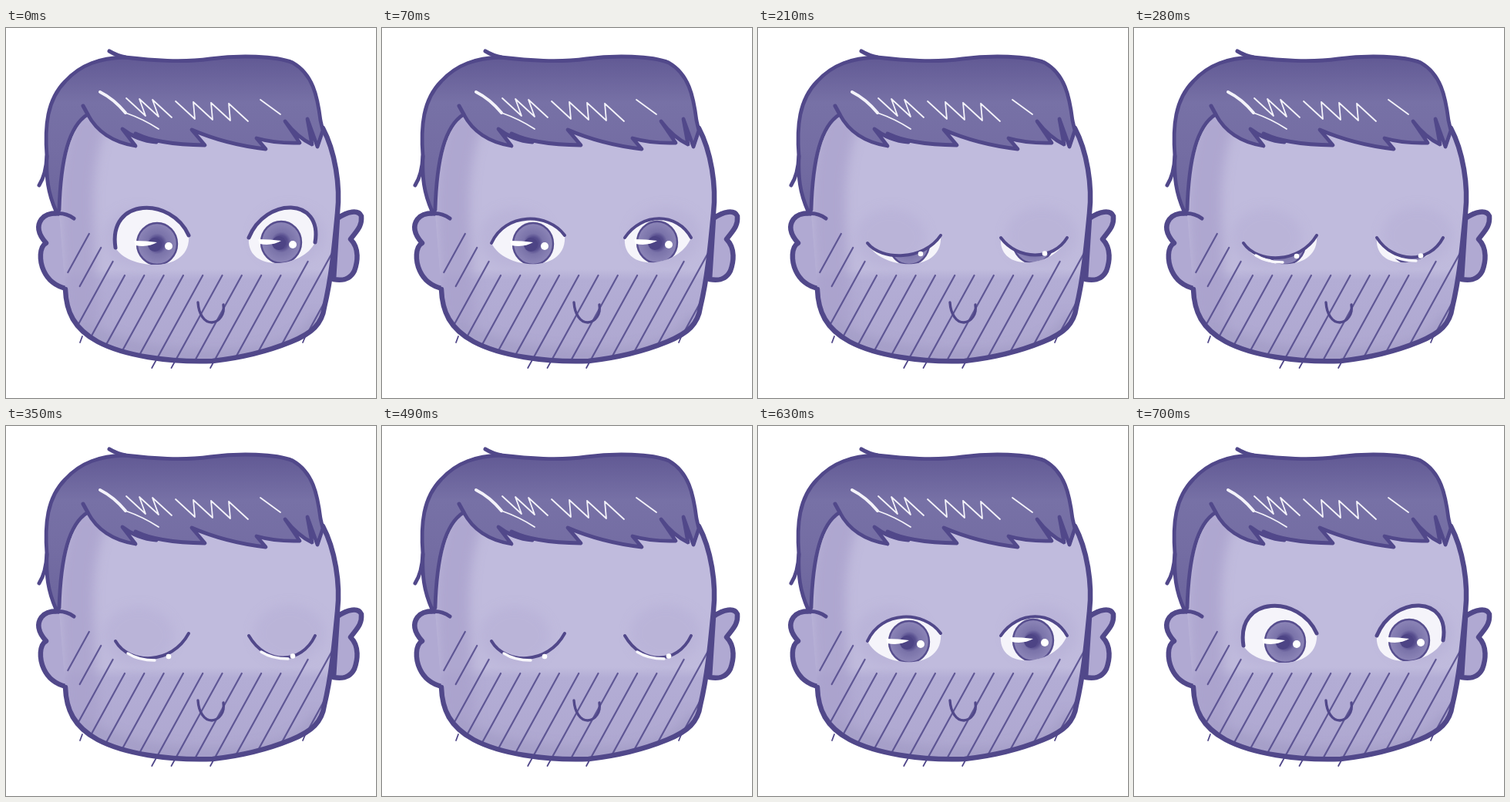
Write an HTML page that moves like this. It is 480 px wide and 480 px high and loops after 1540 ms.

```html
<!DOCTYPE html>
<html lang="en">
<head>
<meta charset="utf-8">
<title>Blink</title>
<style>
html, body { margin: 0; width: 100%; height: 100%; overflow: hidden; background: #fff; }
svg { display: block; width: 100vw; height: 100vh; }
.line { fill: none; stroke: #51488a; stroke-linecap: round; stroke-linejoin: round; }
</style>
</head>
<body>
<svg viewBox="0 0 480 480">
  <defs>
    <linearGradient id="hair" x2="0" y2="1">
      <stop offset="0" stop-color="#615994"/>
      <stop offset=".3" stop-color="#7771a6"/>
      <stop offset=".6" stop-color="#746da3"/>
      <stop offset="1" stop-color="#6c659d"/>
    </linearGradient>
    <linearGradient id="skin" gradientUnits="userSpaceOnUse" x1="0" y1="90" x2="0" y2="433">
      <stop offset=".65" stop-color="#c0bbdd"/>
      <stop offset=".69" stop-color="#b3add5"/>
      <stop offset="1" stop-color="#aea7d0"/>
    </linearGradient>
    <radialGradient id="iris">
      <stop offset="0" stop-color="#483f80"/>
      <stop offset=".32" stop-color="#574e8e"/>
      <stop offset=".5" stop-color="#7a73a9"/>
      <stop offset="1" stop-color="#8d86b8"/>
    </radialGradient>
    <filter id="soft" x="-50%" y="-50%" width="200%" height="200%"><feGaussianBlur stdDeviation="7"/></filter>
    <path id="face" d="M110 111C84 128 73 170 69 240L77 338C78 368 88 390 119 407C153 425 210 434 268 432C304 428 338 420 370 407C397 396 410 384 413 362C422 325 426 282 430 240C434 205 427 160 410 130L390 105L250 90Z"/>
    <path id="mane" d="M65 238C54 213 52 194 53 166C50 128 53 93 77 69C97 47 122 39 154 38C190 42 228 45 265 40C302 35 350 36 372 45C398 60 404 88 408 120L411 133L404 154L391 118L397 151Q378 142 362 121L381 149Q350 150 325 143L337 157Q285 151 241 132L258 152Q196 151 168 137L195 148Q170 146 151 131L168 153Q124 146 106 112C82 127 71 168 69 236Z"/>
    <clipPath id="inFace"><use href="#face"/></clipPath>
  </defs>

  <g class="line" stroke-width="6.5">
    <path fill="#b0a9d2" d="M88 247C77 239 55 237 46 248C38 259 44 270 52 279C43 284 43 302 49 315C55 328 65 335 78 338"/>
    <path fill="#b0a9d2" d="M430 247C443 238 457 235 461 244C462 258 455 263 447 274C459 286 456 304 452 315C446 327 436 328 425 326Z"/>
  </g>
  <use href="#face" fill="url(#skin)"/>
  <g clip-path="url(#inFace)">
    <g filter="url(#soft)" fill="none">
      <path d="M112 115Q88 170 92 250T100 385" stroke="#a8a1cb" stroke-width="44" opacity=".75"/>
      <path d="M95 385Q150 425 265 427T407 375" stroke="#9c95c0" stroke-width="18" opacity=".55"/>
      <ellipse cx="172" cy="272" rx="46" ry="38" fill="#b1aad2" opacity=".4"/>
      <ellipse cx="368" cy="269" rx="46" ry="37" fill="#b1aad2" opacity=".4"/>
    </g>
    <path id="hatch" class="line" stroke-width="2.2" opacity=".85"/>
  </g>
  <path id="ends" class="line" stroke-width="1.8"/>
  <path class="line" stroke-width="6.5" d="M411 130C427 160 434 205 430 240C426 282 422 325 413 362C410 384 397 396 370 407C338 420 304 428 268 432C210 434 153 425 119 407C88 390 78 368 77 339"/>
  <path class="line" stroke-width="5" d="M88 247Q76 239 64 241"/>

  <use href="#mane" fill="url(#hair)"/>
  <use href="#mane" class="line" stroke-width="4.8"/>
  <path class="line" stroke-width="5" d="M134 30Q144 36 155 38M53 166Q52 190 43 204M106 112L100 101"/>
  <g fill="none" stroke="#f4f3fa" stroke-linecap="round" stroke-linejoin="round">
    <path d="M122 83Q140 92 155 110" stroke-width="4"/>
    <path id="shine" stroke-width="1.8"/>
  </g>

  <path class="line" stroke-width="3.4" d="M249 356C250 371 257 382 267 382C277 381 284 371 282 359"/>
  <g id="eyes"></g>
</svg>
<script>
const $ = id => document.getElementById(id);
const set = (id, attrs) => Object.entries(attrs).forEach(([k, v]) => $(id).setAttribute(k, v));

// Parallel cheek strokes; their tops climb towards both sides of the face.
const rayX = (i, y) => 154 + 25.3 * i - 0.55 * (y - 321);
const ray = (i, y1, y2) => `M${rayX(i, y1)} ${y1}L${rayX(i, y2)} ${y2}`;
let hatch = '';
for (let i = -3; i <= 11; i++) {
  const top = 321 - 18 * Math.max(0, -i, i - 8);
  hatch += ray(i, top, i < -1 ? top + 50 : 440);
}
set('hatch', { d: hatch });
set('ends', { d: [4, 5, 7].map(i => ray(i, 430, 441)).join('') + 'M99 400l-3 8M388 401l-3 7' });

function zigzag(x, y, n, step) {
  let d = `M${x} ${y}`;
  for (let i = 0; i < n; i++) d += `L${x + i * step} ${y + i}l25 23`;
  return d;
}
set('shine', { d: zigzag(156, 91, 3, 17) + zigzag(220, 95, 4, 23) + 'M330 93l26 19M155 110Q178 118 198 131' });

// side: direction from the outer corner to the inner one
const eyes = [
  { side: 1, outer: [142, 279], inner: [237, 269], iris: [196, 280] },
  { side: -1, outer: [401, 272], inner: [315, 272], iris: [357, 278] }
];

$('eyes').innerHTML = eyes.map(({ iris: [x, y], outer, inner }, i) => `
  <clipPath id="open${i}"><path id="gap${i}"/></clipPath>
  <g id="ball${i}" clip-path="url(#open${i})">
    <rect x="130" y="220" width="290" height="95" fill="#f5f4fa"/>
    <ellipse cx="${x}" cy="${y}" rx="26" ry="27" fill="url(#iris)" stroke="#574e8e" stroke-width="2.4"/>
    <circle cx="${x - 3}" cy="${y + 1}" r="9" fill="#4d4485"/>
    <path d="M${x - 30} ${y - 4}q16 0 30 2q-12 7 -28 4z" fill="#fff"/>
  </g>
  <path id="lid${i}" class="line"/>
  <path id="sliver${i}" d="M${Math.min(outer[0], inner[0]) + 16} ${y + 15}q14 9 35 9" fill="none" stroke="#f8f7fc" stroke-width="3.4" stroke-linecap="round"/>
  <circle id="dot${i}" fill="#fff"/>`).join('');

// Height of the lid's control points: wide open, relaxed, drooping, shut.
const bows = [219, 239, 302, 310];

function pose(p) {
  const n = Math.min(2, Math.floor(p));
  const bow = bows[n] + (bows[n + 1] - bows[n]) * (p - n);
  const wide = Math.max(0, 1 - p);
  eyes.forEach(({ side, outer: [ox, oy], inner: [ix, iy], iris: [x, y] }, i) => {
    const start = `${ox} ${oy + 6 * wide}`;
    const lid = `M${start}C${ox + side * (18 - 28 * wide)} ${bow} ${ix - side * 22} ${bow} ${ix} ${iy}`;
    const middle = (oy + iy) / 8 + bow * 0.75;
    set('lid' + i, { d: lid, 'stroke-width': 4 + wide });
    set('gap' + i, { d: `${lid}C${ix + side * 4} ${y + 40} ${ox + side * 16} ${y + 34} ${start}Z` });
    set('ball' + i, { opacity: p < 3 ? 1 : 0 });
    set('sliver' + i, { opacity: p < 2.5 ? 0 : 1 });
    set('dot' + i, { cx: x + 15, cy: Math.max(y + 3, middle - 2), r: p < 2 ? 5 : 3.3 });
  });
}

// The blink advances every 70 ms, then the eyes stay open.
const blink = [0, 1, 1.5, 2, 2.5, 3, 3, 3, 1.5, 1, 0];
const begin = performance.now();
function draw() {
  const t = Math.max(0, performance.now() - begin) % 1540;
  pose(blink[Math.min(10, Math.floor(t / 70))]);
  requestAnimationFrame(draw);
}
draw();
</script>
</body>
</html>
```
